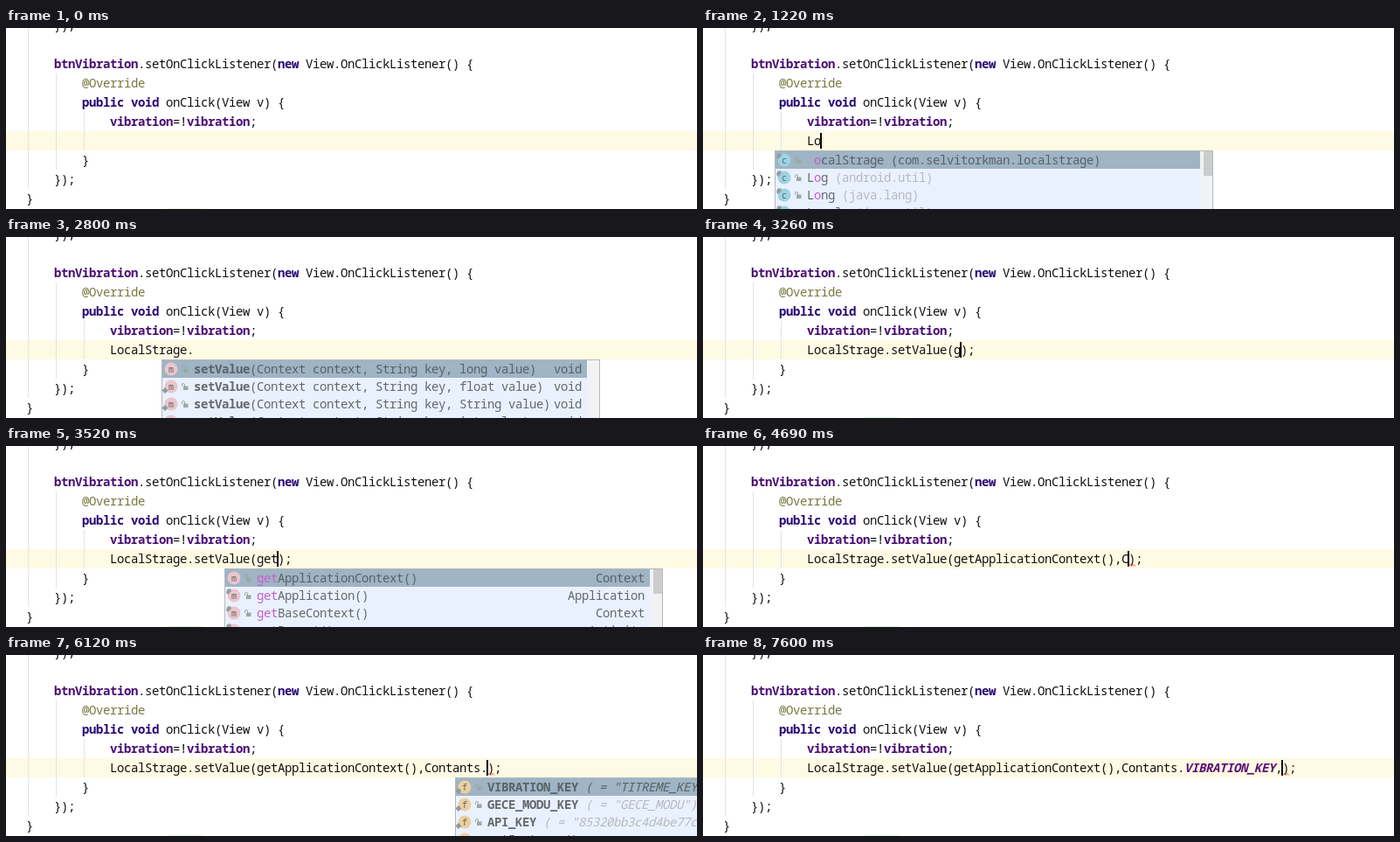
An HTML page for the animation above (8000 ms loop, 791 by 207 pixels).

```html
<!DOCTYPE html>
<html lang="en">
<head>
<meta charset="utf-8">
<title>Code completion</title>
<style>
html, body { margin: 0; width: 100%; height: 100%; overflow: hidden; background: #fff; }
svg { display: block; }
text { font: 14px "Noto Sans Mono", monospace; letter-spacing: -.4px; white-space: pre; font-variant-ligatures: none; }
.b { font-weight: 700; }
.i { font-style: italic; }
.icon { font: 500 10px "Noto Sans Mono", monospace; letter-spacing: 0; text-anchor: middle; }
</style>
</head>
<body>
<svg id="stage" width="791" height="207" viewBox="0 0 791 207">
  <rect width="791" height="207" fill="#fff"/>
  <rect y="118" width="791" height="22" fill="#fffae3"/>
  <path d="M25.5 0V184M57.5 52V162M89.5 96V140" stroke="#e4e4e4"/>
  <g id="code"></g>
  <g id="live"></g>
</svg>
<script>
const LOOP = 8000, CW = 8, LEFT = 119, POPUP_W = 502;
const INK = '#101010', FIELD = '#480c72', KEYWORD = '#280873', HIT = '#c65fca', SELECTED = '#9fb4c4';
const el = id => document.getElementById(id);
const esc = s => s.replace(/&/g, '&amp;').replace(/</g, '&lt;');
const rect = (x, y, w, h, fill) => `<rect x="${x}" y="${y}" width="${w}" height="${h}" fill="${fill}"/>`;
const label = (x, y, s, fill = INK, cls = '') =>
  s && `<text x="${x}" y="${y}" fill="${fill}" class="${cls}">${esc(s)}</text>`;

// Consecutive runs on the character grid: [text, colour, class]
function runs(x, y, list) {
  return list.map(([s, fill, cls]) => {
    const out = label(x, y, s, fill, cls);
    x += s.length * CW;
    return out;
  }).join('');
}

el('code').innerHTML = [
  [55, 2, [['});']]],
  [55, 46, [['btnVibration', FIELD, 'b'], ['.setOnClickListener('], ['new', KEYWORD, 'b'],
    [' View.OnClickListener() {']]],
  [87, 68, [['@Override', '#787842']]],
  [87, 90, [['public void', KEYWORD, 'b'], [' onClick(View v) {']]],
  [119, 112, [['vibration', FIELD, 'b'], ['=!'], ['vibration', FIELD, 'b'], [';']]],
  [87, 156, [['}']]],
  [55, 178, [['});']]],
  [23, 200, [['}']]]
].map(line => runs(...line)).join('');

const OBJ = 'LocalStrage', CALL = OBJ + '.setValue(';
const CTX = CALL + 'getApplicationContext()', ARG = CTX + ',';
const CONST = ARG + 'Contants', KEY = CONST + '.VIBRATION_KEY';
const PKG = ' (com.selvitorkman.localstrage)';
const setter = type => ['setValue', `(Context context, String key, ${type} value)`, 'void'];

// Lookup lists; rows are [name, tail, type]
const classes = {
  at: 0, letter: 'c', tint: '#9dd3e3', mark: 'pin', from: 1,
  rows: [[OBJ, PKG], ['Log', ' (android.util)'], ['Long', ' (java.lang)'], ['Locale', ' (java.util)']]
};
const setters = {
  at: 12, letter: 'm', tint: '#ebc5cb', mark: 'static', bold: true, plainTail: true, noThumb: true,
  rows: ['long', 'float', 'String', 'int'].map(setter)
};
const getters = {
  at: 21, letter: 'm', tint: '#ebc5cb', mark: 'pin',
  rows: [['getApplicationContext()', '', 'Context'], ['getApplication()', '', 'Application'],
    ['getBaseContext()', '', 'Context'], ['getParent()', '', 'Activity']]
};
const types = {
  at: 45, letter: 'c', tint: '#9dd3e3', mark: 'pin',
  rows: [['Contants', PKG], ['Context', ' (android.content)'],
    ['ContentValues', ' (android.content)'], ['Canvas', ' (android.graphics)']]
};
const fields = {
  at: 54, letter: 'f', tint: '#ecd09f', mark: 'static', bold: true, italic: true,
  rows: [['VIBRATION_KEY', ' ( = "TITREME_KEY")'], ['GECE_MODU_KEY', ' ( = "GECE_MODU")'],
    ['API_KEY', ' ( = "85320bb3c4d4be77c")'], ['getInstance()', '']]
};

// [start, text before the caret, open lookup]
const steps = [
  [0, ''], [1040, 'L'], [1130, 'L', classes], [1220, 'Lo', classes],
  [1780, OBJ], [2010, OBJ + '.'], [2040, OBJ + '.', setters],
  [2830, CALL], [3260, CALL + 'g'], [3340, CALL + 'ge', getters], [3520, CALL + 'get', getters],
  [3800, CTX], [4230, ARG], [4590, ARG + 'C'], [4870, ARG + 'C', types],
  [5050, ARG + 'Co', types], [5430, ARG + 'Con', types], [5560, ARG + 'Cont', types],
  [5790, CONST], [6020, CONST + '.'], [6120, CONST + '.', fields],
  [6960, KEY], [7270, KEY + ',']
];
const caretOff = [[0, 810], [2800, 2830], [6730, 6960]];
const within = (t, [a, b]) => t >= a && t < b;

function icon(x, y, list, selected) {
  const mark = list.mark === 'static'
    ? `<path d="M${x + 4} ${y + 1}l3.5 3.5-3.5 3.5-3.5-3.5z" fill="#8d9aa3"/>`
    : `<path d="M${x + 3} ${y - 7}l4-1 1 3-4 4-2-2z" fill="#939da4"/>`;
  return `<circle cx="${x + 11}" cy="${y}" r="7.5" fill="${list.tint}"/>` +
    label(x + 11, y + 3.5, list.letter, '#5d6468', 'icon') +
    (selected && list.letter === 'm' ? '' : mark) +
    `<path d="M${x + 23.5} ${y}v-2q0-1.5 1.5-1.5t1.5 1.5v2" fill="none" stroke="#9ba9a2"/>` +
    rect(x + 25, y - .5, 5.5, 4.5, '#9ba9a2');
}

function popup(list, typed) {
  const x = LEFT + list.at * CW - 37, prefix = typed.slice(list.at), from = list.from || 0;
  let out = rect(x, 140, POPUP_W, 70, '#b4b9bd') + rect(x + 1, 141, POPUP_W - 2, 69, '#eaf1fe') +
    rect(x + 1, 141, 486, 20, SELECTED) + rect(x + 487, 141, 14, 69, '#f1f2f3');
  if (!list.noThumb) out += rect(x + 491, 141, 10, 28, '#cbcccd');
  list.rows.forEach(([name, tail, type = ''], i) => {
    const y = 151 + i * 20;
    const ink = i ? '#64686c' : '#596268';
    const soft = i && !list.plainTail ? '#b6babf' : ink;
    const cls = list.bold && !name.endsWith(')') ? 'b' : '';
    const hits = name.startsWith(prefix) ? prefix.length : 1;
    out += icon(x, y, list, !i) + runs(x + 37, y + 5, [
      [name.slice(0, from), i ? ink : SELECTED, cls],
      [name.slice(from, hits), HIT, cls],
      [name.slice(Math.max(from, hits)), ink, cls],
      [tail, soft, list.italic ? 'i' : '']
    ]) + label(x + 481 - type.length * CW, y + 5, type, ink);
  });
  return out;
}

function scene(t) {
  const [, typed, list] = steps.filter(s => s[0] <= t).pop();
  const end = LEFT + typed.length * CW;
  let out = rect(184, 206, 40, 1, t < 2830 ? '#f6f5e6' : '#e2f6da');
  if (within(t, [3800, 4590])) out += rect(LEFT + 42 * CW, 118, 16, 22, '#93d9d9');

  // The constant takes its style once the code has been analysed
  const cut = t >= 7600 ? CONST.length + 1 : typed.length;
  out += runs(LEFT, 134, [
    [typed.slice(0, cut)],
    [typed.slice(cut, KEY.length), '#5c0d78', 'b i'],
    [cut < typed.length ? typed.slice(KEY.length) : ''],
    [typed.startsWith(CALL) ? ');' : '']
  ]);
  if (t >= 4690) {
    out += `<path d="M${end} 137.5l2-2 2 2 2-2 2 2" fill="none" stroke="#f04a42"/>`;
  }
  if (!caretOff.some(span => within(t, span))) out += rect(end - 1, 120, 2, 18, '#000');
  return out + (list ? popup(list, typed) : '');
}

let shown = '';
function tick() {
  const next = scene(performance.now() % LOOP);
  if (next !== shown) el('live').innerHTML = shown = next;
  requestAnimationFrame(tick);
}
tick();
</script>
</body>
</html>
```
